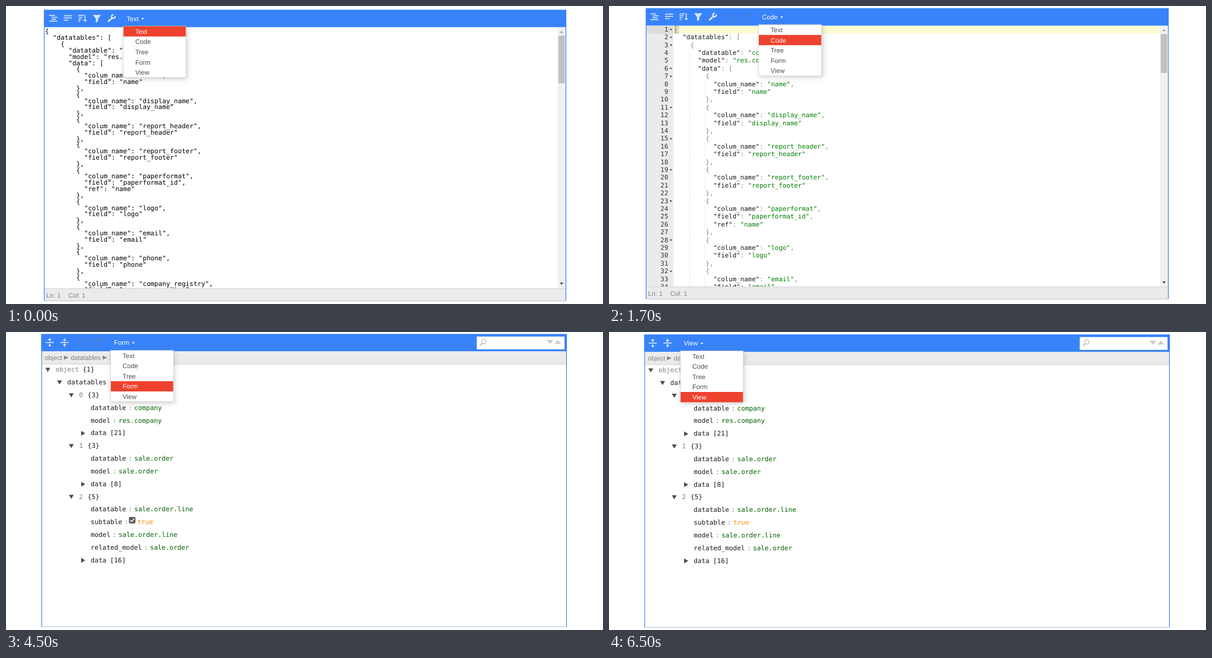
An HTML page with a canvas that plays this animation: 1024x512 px, repeating every 8 s.

```html
<!DOCTYPE html>
<html lang="en">
<head>
<meta charset="utf-8">
<title>Editor modes</title>
<style>
html, body { margin: 0; width: 100%; height: 100%; overflow: hidden; background: #fff; }
canvas { display: block; }
</style>
</head>
<body>
<canvas id="stage" width="1024" height="512"></canvas>
<script>
const c = document.getElementById("stage").getContext("2d");
c.textRendering = "geometricPrecision";
c.lineJoin = "round";

const BLUE = "#3883fa", RED = "#ee422e", PANEL = "#ebebeb", EDGE = "#d3d3d3";
const INK = "#1a1a1a", GRAY = "#808080", ICON = "#d3e3fd", ICON_OFF = "#4c7fce";
const SANS = '"Liberation Sans", Arial, sans-serif';
const MONO = '"DejaVu Sans Mono", monospace';
const MODES = ["Text", "Code", "Tree", "Form", "View"];

const SCENES = [
  { end: 500, box: [65, 6.4, 961, 507], menu: 201, view: textView,
    icons: { format: 81, compact: 106, sort: 131, filter: 156, wrench: 181 } },
  { end: 2500, box: [63, 3.7, 960, 504], menu: 256.5, view: codeView,
    icons: { format: 78, compact: 103, sort: 128, filter: 153, wrench: 178, undo: 209, redo: 235 } },
  { end: 4500, box: [61, 3.3, 961.5, 507], menu: 230, view: treeView, handles: true, check: true, crumbX: 67.2,
    icons: { expand: 76, collapse: 101, sort: 126, filter: 152, undo: 182, redo: 208 } },
  { end: 6500, box: [60.5, 3.3, 962, 507], menu: 179.3, view: treeView, check: true, crumbX: 66.5,
    icons: { expand: 75, collapse: 100.5, undo: 131, redo: 157 } },
  { end: 8000, box: [60.5, 4.2, 962, 508], menu: 122.3, view: treeView, crumbX: 66.5,
    icons: { expand: 75, collapse: 100.5 } }
];

const FIELDS = ["name", "display_name", "report_header", "report_footer",
  "paperformat", "logo", "email", "phone", "company_registry"];
const LINES = ["{", '  "datatables": [', "    {", '      "datatable": "company",',
  '      "model": "res.company",', '      "data": ['];
for (const name of FIELDS) {
  const ref = name === "paperformat";
  LINES.push("        {", `          "colum_name": "${name}",`,
    `          "field": "${name}${ref ? '_id",' : '"'}`);
  if (ref) LINES.push('          "ref": "name"');
  LINES.push("        },");
}

// level, name, value; bracketed values are branches
const ROWS = [
  [0, "object", "{1}"], [1, "datatables", "[3]"],
  [2, "0", "{3}"], [3, "datatable", "company"], [3, "model", "res.company"], [3, "data", "[21]"],
  [2, "1", "{3}"], [3, "datatable", "sale.order"], [3, "model", "sale.order"], [3, "data", "[8]"],
  [2, "2", "{5}"], [3, "datatable", "sale.order.line"], [3, "subtable", "true"],
  [3, "model", "sale.order.line"], [3, "related_model", "sale.order"], [3, "data", "[16]"]
];

function rect(x, y, w, h, color) {
  c.fillStyle = color;
  c.fillRect(x, y, w, h);
}

function poly(color, ...p) {
  c.fillStyle = color;
  c.beginPath();
  for (let i = 0; i < p.length; i += 2) c.lineTo(p[i], p[i + 1]);
  c.fill();
}

function line(...p) {
  c.beginPath();
  for (let i = 0; i < p.length; i += 2) c.lineTo(p[i], p[i + 1]);
  c.stroke();
}

const down = (x, y, w, h, color) => poly(color, x - w, y - h, x + w, y - h, x, y + h);
const right = (x, y, w, h, color) => poly(color, x - w, y - h, x + w, y, x - w, y + h);

// y is the middle of the capitals; returns the width
function text(s, x, y, color, font = SANS, size = 11.2) {
  c.font = `${size}px ${font}`;
  c.fillStyle = color;
  c.fillText(s, x, y + 3.9);
  return c.measureText(s).width;
}

function arrowDown(x, from, to) {
  const d = Math.sign(to - from);
  line(x, from, x, to - d * 2);
  poly(c.strokeStyle, x - 3.5, to - d * 3.2, x + 3.5, to - d * 3.2, x, to);
}

function turn() {
  c.beginPath();
  c.arc(0.5, 0.5, 5.8, -2.5, 1.9);
  c.stroke();
  poly(c.strokeStyle, -7.5, -6, -7.5, 0, -1.5, 0);
}

const ICONS = {
  format() { line(-7, -5, 3, -5); line(-3, -1.7, 7, -1.7); line(-3, 1.7, 5, 1.7); line(-7, 5, 7, 5); },
  compact() { line(-7, -4.5, 7, -4.5); line(-7, -0.7, 7, -0.7); line(-7, 3.2, 1, 3.2); },
  sort() {
    line(-7, -5, 2, -5); line(-7, -1.7, 0, -1.7); line(-7, 1.7, -2, 1.7); line(-7, 5, -4, 5);
    arrowDown(4.5, -6, 6);
  },
  filter() { poly(ICON, -7, -6, 7, -6, 2, 0.5, 2, 5, -2, 7.5, -2, 0.5); },
  wrench() {
    c.lineWidth = 2.8;
    line(-6, 6, 1.5, -1.5);
    c.lineWidth = 2.6;
    c.beginPath();
    c.arc(3, -3, 3, -0.3, 4.9);
    c.stroke();
  },
  expand() { line(-7, 0, 7, 0); arrowDown(0, -2, -7.5); arrowDown(0, 2, 7.5); },
  collapse() { line(-7, 0, 7, 0); arrowDown(0, -7.5, -1.5); arrowDown(0, 7.5, 1.5); },
  undo: turn,
  redo() { c.scale(-1, 1); turn(); }
};

function icon(name, x, y) {
  c.save();
  c.translate(x, y);
  c.strokeStyle = /do$/.test(name) ? ICON_OFF : ICON;
  c.lineWidth = 1.7;
  ICONS[name]();
  c.restore();
}

function scrollbar(x, top, bottom, thumb) {
  rect(x, top, 14, bottom - top, "#f1f1f1");
  rect(x + 1.5, top + 14, 11, thumb, "#c1c1c1");
  down(x + 7, top + 7.5, 3.2, -1.7, "#a3a3a3");
  down(x + 7, bottom - 8, 3.2, 1.7, "#404040");
}

function statusBar([l, , r, b]) {
  rect(l + 1, b - 22, r - l - 2, 21.5, PANEL);
  rect(l + 1, b - 22, r - l - 2, 1, EDGE);
  text("Ln: 1", l + 4, b - 10, GRAY);
  text("Col: 1", l + 42, b - 10, GRAY);
}

function clipped([l, t, r, b], draw) {
  c.save();
  c.beginPath();
  c.rect(l, t + 30, r - l, b - t - 52);
  c.clip();
  draw();
  c.restore();
}

function textView({ box }) {
  clipped(box, () => LINES.forEach((s, i) => text(s, 67, 43.5 + i * 10.83, "#000", MONO, 11.13)));
  scrollbar(946, 37, 485, 82);
  statusBar(box);
}

function codeView({ box }) {
  const size = 10.96, w = size * 0.602, x0 = 113, rowH = 13.4;
  clipped(box, () => {
    rect(64, 33, 46.5, 452, PANEL);
    rect(64, 34, 46.5, rowH, "#dcdcdc");
    rect(110.5, 34, 835, rowH, "#fffbd1");
    c.strokeStyle = "#c0c0c0";
    c.lineWidth = 1;
    c.strokeRect(113.5, 34.5, 6, 12);
    rect(113, 34, 1, 13, "#555");
    LINES.forEach((s, i) => {
      const y = 39.9 + i * rowH, n = String(i + 1);
      text(n, 101.5 - n.length * w, y, "#333", MONO, size);
      if (/[{[]$/.test(s)) down(106.3, y + 0.8, 2.5, 1.4, "#555");
      // indent guides
      for (let col = 4; col < s.search(/\S/); col += 4)
        rect(Math.floor(x0 + col * w) - 1, y - rowH / 2, 1, rowH, "#ececec");
      for (const m of s.matchAll(/"[^"]*"|[^"\s]+/g)) {
        const isKey = s[m.index + m[0].length] === ":";
        const color = m[0][0] !== '"' ? GRAY : isKey ? INK : "#008000";
        text(m[0], x0 + m.index * w, y, color, MONO, size);
      }
    });
  });
  scrollbar(945, 34, 483, 67);
  statusBar(box);
}

function crumbs(x, y) {
  for (const s of ["object", "datatables", "2"]) {
    x += text(s, x, y, GRAY);
    right(x + 7, y, 3.8, 3.5, GRAY);
    x += 14.6;
  }
}

function search(r, t) {
  const x = r - 154.5, y = t + 14;
  rect(x, t + 4.5, 150.5, 22, "#fff");
  c.strokeStyle = "#c6c6c6";
  c.lineWidth = 1.6;
  c.beginPath();
  c.arc(x + 12, y - 1, 3.8, 0, 7);
  c.stroke();
  c.lineWidth = 2.2;
  line(x + 9, y + 2, x + 5, y + 6);
  down(r - 29, y, 5.8, 3.3, "#cacaca");
  down(r - 15.5, y, 5.8, -3.3, "#cacaca");
}

function handles(y, drag) {
  if (drag)
    for (let i = 0; i < 6; i++) rect(68.5 + i % 2 * 4.6, y - 5.5 + (i >> 1) * 4.5, 2.6, 2.6, "#c6c6c6");
  c.strokeStyle = "#bdbdbd";
  c.lineWidth = 1.2;
  c.strokeRect(87.8, y - 4.5, 9, 9.4);
  line(87.8, y - 1.6, 96.8, y - 1.6);
}

function checkbox(x, y) {
  c.fillStyle = "#5c5c5c";
  c.beginPath();
  c.roundRect(x, y - 5.6, 11.2, 11.2, 2);
  c.fill();
  c.strokeStyle = "#fff";
  c.lineWidth = 1.6;
  line(x + 2.4, y, x + 4.6, y + 2.4, x + 8.9, y - 2.8);
}

function treeView(s) {
  const [l, t, r] = s.box;
  rect(l + 1, t + 30, r - l - 2, 22, PANEL);
  rect(l + 1, t + 51.3, r - l - 2, 1, EDGE);
  crumbs(s.crumbX, t + 40.8);
  search(r, t);
  ROWS.forEach(([level, name, value], i) => {
    const y = t + 61.1 + i * 21.82;
    const x = (s.handles ? 125.6 : 84.9) + level * 20.15;
    const branch = /^[{[]/.test(value);
    const readonly = /^(object|\d)$/.test(name);
    if (s.handles) handles(y + 0.5, i > 0);
    const end = x + Math.max(8.6, text(name, x, y, readonly ? GRAY : INK, MONO));
    if (branch) {
      if (level < 3) down(x - 13.2, y + 0.6, 4.2, 3.5, "#4d4d4d");
      else right(x - 13, y + 0.6, 3.5, 4.2, "#4d4d4d");
      text(value, end + 6.2, y, INK, MONO);
      return;
    }
    text(":", end + 3.8, y, GRAY, MONO);
    const bool = value === "true";
    if (bool && s.check) checkbox(end + 11.6, y - 2.8);
    text(value, end + (bool && s.check ? 26 : 14), y, bool ? "#ff8c00" : "#006000", MONO);
  });
}

function menu(x, top, pick) {
  const y = top + 28.4, step = 17.6;
  const w = text(MODES[pick], x + 6, top + 15.2, "#fff");
  down(x + w + 13, top + 15.7, 2.6, 1.4, "#fff");
  c.save();
  c.shadowColor = "rgba(128,128,128,.4)";
  c.shadowBlur = 8;
  c.shadowOffsetX = c.shadowOffsetY = 2;
  rect(x, y, 108, step * 5, "#fff");
  c.restore();
  c.strokeStyle = EDGE;
  c.lineWidth = 0.8;
  c.strokeRect(x, y, 108, step * 5);
  rect(x + 0.5, y + pick * step, 107, step, RED);
  MODES.forEach((s, i) =>
    text(s, x + 20.7, y + 9 + i * step, i === pick ? "#fff" : "#4d4d4d"));
}

function draw(now) {
  const t = now % 8000;
  const pick = SCENES.findIndex(s => t < s.end), s = SCENES[pick];
  const [l, top, r, b] = s.box;
  rect(0, 0, 1024, 512, "#fff");
  rect(l, top, r - l, 30, BLUE);
  s.view(s);
  rect(l, top, 1.2, b - top, BLUE);
  rect(r - 1.2, top, 1.2, b - top, BLUE);
  rect(l, b - 1, r - l, 1, "#b5bfd0");
  for (const name in s.icons) icon(name, s.icons[name], top + 14.8);
  menu(s.menu, top, pick);
}

function tick() {
  draw(performance.now());
  requestAnimationFrame(tick);
}
tick();
</script>
</body>
</html>
```
